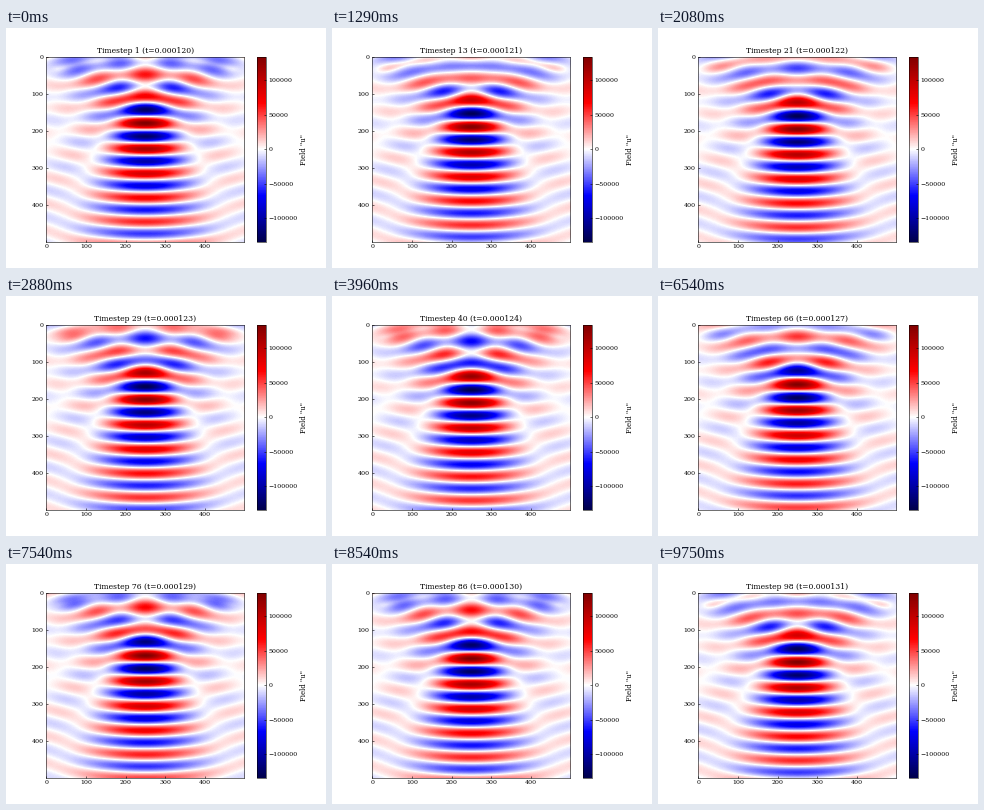
A matplotlib script that plays this animation: 320 by 240 pixels, repeating every 9790 ms.

```python
import numpy as np
import matplotlib.pyplot as plt
from matplotlib.animation import FuncAnimation

FRAMES = 235
LOOP_MS = 9790
STEPS = 98
STEPS_PER_CYCLE = 87
PEAK = 1.343e5

# Bowl transducer and viewing plane, in mm
RADIUS, APERTURE, WAVELENGTH = 64.0, 32.0, 15.05
DEPTH, HALF_WIDTH = 120.0, 35.0
ROWS, HALF_COLS = 120, 50


def bowl_points(rings=60, sectors=80):
    """Points and area weights on half of the bowl; symmetry covers the rest."""
    edge = np.arcsin(APERTURE / RADIUS)
    tilt = (np.arange(rings) + 0.5) / rings * edge
    turn = (np.arange(sectors) + 0.5) / sectors * np.pi
    tilt, turn = (g.ravel() for g in np.meshgrid(tilt, turn))
    ring = RADIUS * np.sin(tilt)
    return (ring * np.cos(turn), ring * np.sin(turn),
            RADIUS * (1 - np.cos(tilt)), np.sin(tilt))


def steady_field():
    """Complex pressure in the plane through the bowl's axis."""
    px, py, pz, weight = bowl_points()
    k = 2 * np.pi / WAVELENGTH
    x = (np.arange(HALF_COLS) + 0.5) / HALF_COLS * HALF_WIDTH
    depths = (np.arange(ROWS) + 0.5) / ROWS * DEPTH
    across = (x[:, None] - px) ** 2 + py ** 2 + 1.2 ** 2
    half = np.empty((ROWS, HALF_COLS), complex)
    for row, z in enumerate(depths):
        r = np.sqrt(across + (z - pz) ** 2)
        half[row] = (np.exp(1j * k * r) / r) @ weight

    axis = half[:, 0]
    peak = np.abs(axis[30:]).max()
    # A trough sits on the axis at this depth when the loop starts
    trough = axis[np.argmin(np.abs(depths - 51.5))]
    half *= -PEAK / peak * np.conj(trough) / abs(trough)
    return np.hstack([half[:, ::-1], half])


def step_at(frame):
    return min(int(frame * 10 / 24 + 0.21), STEPS - 1)


def snapshot(step):
    return np.real(field * np.exp(-2j * np.pi * step / STEPS_PER_CYCLE))


def title_text(step):
    seconds = (120.015 + 0.115 * step) * 1e-6
    return f"Timestep {step + 1} (t={seconds:.6f})"


plt.rcParams.update({
    "font.family": "DejaVu Serif",
    "font.size": 9,
    "axes.titlesize": 11,
    "axes.labelsize": 10,
    "axes.linewidth": 0.8,
    "xtick.direction": "in",
    "ytick.direction": "in",
})

field = steady_field()
fig, ax = plt.subplots(figsize=(6.4, 4.8), dpi=50)
image = ax.imshow(snapshot(0), cmap="seismic", vmin=-PEAK, vmax=PEAK,
                  aspect="auto", interpolation="bilinear",
                  extent=(-0.5, 499.5, 499.5, -0.5))
ax.set_xticks(range(0, 500, 100))
ax.set_yticks(range(0, 500, 100))
title = ax.set_title(title_text(0))
fig.colorbar(image, ax=ax, label='Field "u"',
             ticks=range(-100000, 100001, 50000))


def update(frame):
    step = step_at(frame)
    image.set_data(snapshot(step))
    title.set_text(title_text(step))
    return image, title


anim = FuncAnimation(fig, update, frames=FRAMES, interval=LOOP_MS / FRAMES,
                     repeat=True, repeat_delay=0)
plt.show()
```
